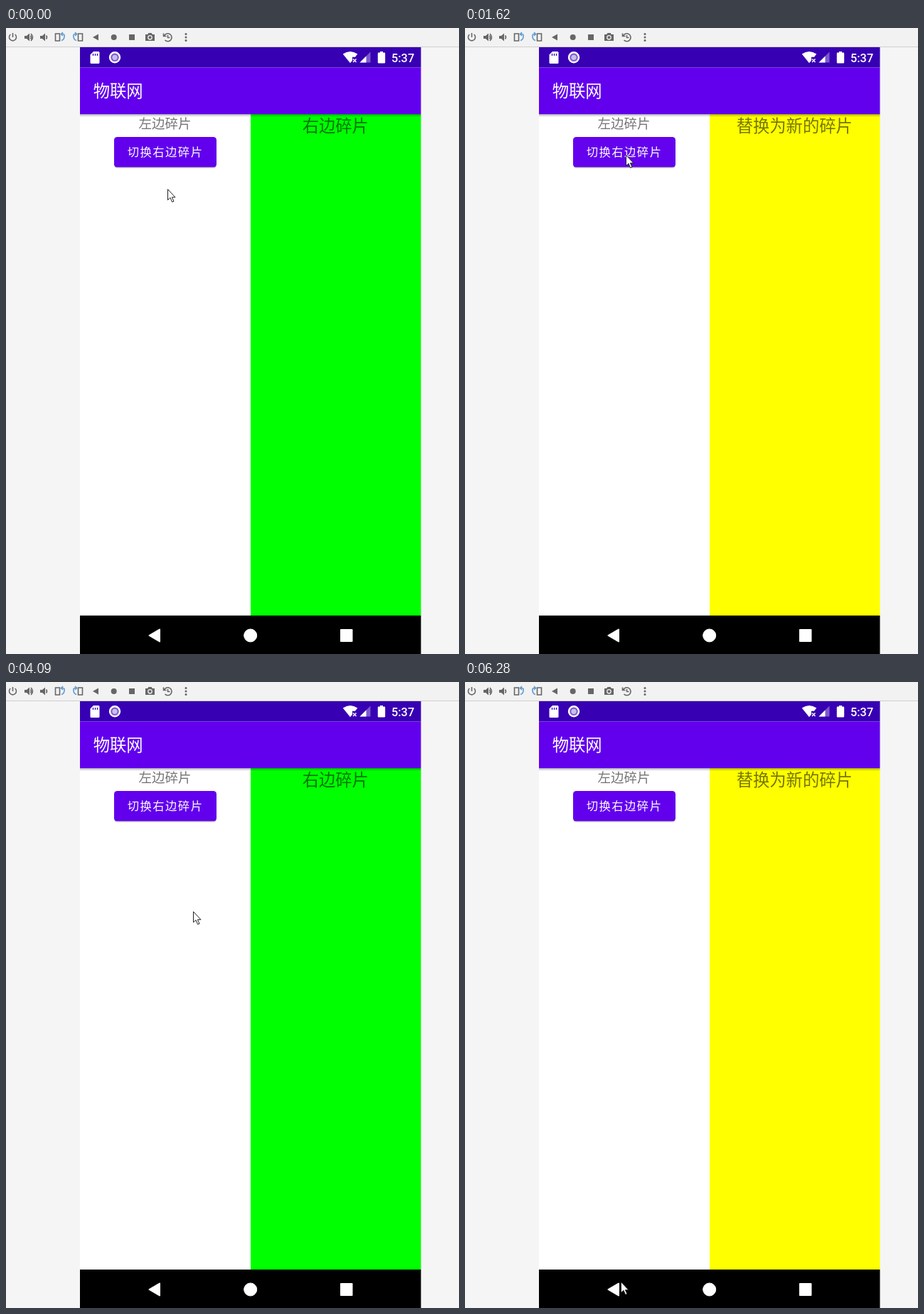
These frames come from a looping animation (637 px wide and 879 px high, 6660 ms). An HTML page:

```html
<!DOCTYPE html>
<html lang="zh-CN">
<head>
<meta charset="utf-8">
<style>
html, body { margin: 0; width: 100%; height: 100%; overflow: hidden; background: #f5f5f5; }
svg { display: block; width: 637px; height: 879px; }
text { font-family: "Noto Sans CJK SC", "Noto Sans CJK", sans-serif; font-size: 23.33px; }
.mid { text-anchor: middle; }
.line { fill: none; stroke: #666; stroke-width: 1.6; }
.blue { fill: none; stroke: #5a9bd5; stroke-width: 1.6; }
</style>
</head>
<body>
<svg viewBox="0 0 637 879">
  <defs>
    <linearGradient id="fade" x2="0" y2="1">
      <stop stop-opacity=".3"/><stop offset="1" stop-opacity="0"/>
    </linearGradient>
    <filter id="blur" x="-20%" y="-40%" width="140%" height="180%"><feGaussianBlur stdDeviation="3"/></filter>
    <filter id="soft"><feGaussianBlur stdDeviation=".7"/></filter>
    <clipPath id="face"><rect x="152" y="153" width="144" height="42.5" rx="4.5"/></clipPath>
    <clipPath id="phone"><rect x="104" y="27" width="479.5" height="852"/></clipPath>
  </defs>

  <!-- emulator controls -->
  <rect width="637" height="26" fill="#f2f2f2"/>
  <rect y="26" width="637" height="1" fill="#cfcfcf"/>
  <g fill="#666">
    <path class="line" d="M6.3 9a5 5 0 1 0 6.4 0M9.5 7v6"/>
    <path d="M26 11h3l4-3.5v11l-4-3.5h-3zM48 11h3l4-3.5v11l-4-3.5h-3z"/>
    <path class="line" d="M34.5 10.5q2 2.500 0 5M35 8q5 5 0 10M56.500 10.500q2 2.500 0 5"/>
    <path class="line" d="M69.500 8h6v10h-6zM101.500 8h6v10h-6z"/>
    <path class="blue" d="M78 8.500h2.500q2 0 1.500 4t-4 5M80 6l-2.500 2.500 2.500 2.500M99 8.500h-2.500q-2 0-1.500 4t4 5M97 6l2.500 2.500-2.500 2.500"/>
    <path d="M122 13l8-4.500v9z"/>
    <circle cx="151.700" cy="13" r="4"/>
    <rect x="173" y="9" width="8" height="8"/>
    <path d="M196 9h3l1.500-2h4l1.500 2h3v9h-13z"/>
    <circle cx="202.500" cy="13.300" r="2.700" fill="#666" stroke="#f2f2f2" stroke-width="1.300"/>
    <path class="line" d="M222.500 11a5.500 5.500 0 1 1 1 6M221.500 7.500v4h4M227.500 10v3.500h3"/>
    <circle cx="253" cy="8.500" r="1.500"/><circle cx="253" cy="13" r="1.500"/><circle cx="253" cy="17.500" r="1.500"/>
  </g>

  <g clip-path="url(#phone)">
    <rect x="104" y="121" width="240" height="704" fill="#fff"/>
    <rect id="panel" x="344" y="121" width="240" height="704"/>
    <rect x="104" y="121" width="480" height="4" fill="url(#fade)"/>
    <rect x="104" y="27" width="480" height="28.500" fill="#3700b3"/>
    <rect x="104" y="55.500" width="480" height="65.500" fill="#6200ee"/>

    <!-- status bar -->
    <g fill="#fff">
      <path d="M123 33h7q1.500 0 1.500 1.500v14q0 1.500-1.500 1.500h-10q-1.500 0-1.500-1.500V37.500z"/>
      <path d="M122.500 36v3M125.500 36v3M128.500 36v3" stroke="#3700b3" stroke-width="1.300"/>
      <circle cx="153" cy="41.300" r="7" fill="#7d5fcd" stroke="#fff" stroke-width="2.400"/>
      <circle cx="153" cy="41.300" r="3.600" fill="#cbbcec"/>
      <path d="M473.700 36.500q10.300-7 20.600 0l-3.300 4.200h-4v5l-3 3.600z"/>
      <path d="M488 43.500l4.500 4.500M492.500 43.500l-4.500 4.500" stroke="#fff" stroke-width="1.500"/>
      <path d="M512.500 33.500v15h-15z" opacity=".35"/>
      <path d="M506.500 39.500v9h-9z"/>
      <path d="M526 33h4v1.500h2q1.200 0 1.200 1.200v12.600q0 1.200-1.200 1.200h-8q-1.200 0-1.200-1.200V35.700q0-1.200 1.200-1.200h2z"/>
      <text x="542" y="47.700" style="font: 500 16.330px Roboto, sans-serif">5:37</text>
      <text x="122.700" y="97">物联网</text>
    </g>

    <text class="mid" x="223.500" y="141" style="font-size:18.500px" fill="#757575">左边碎片</text>
    <text class="mid" id="label" x="463.300" y="145.500" fill-opacity=".54"></text>

    <!-- button -->
    <rect id="lift" x="152" y="156" width="144" height="42" rx="4.500" filter="url(#blur)"/>
    <rect x="152" y="154" width="144" height="42.500" rx="4.500" opacity=".3" filter="url(#soft)"/>
    <g clip-path="url(#face)">
      <rect x="152" y="153" width="144" height="42.500" fill="#6200ee"/>
      <rect id="wash" x="152" y="153" width="144" height="42.500" fill="#fff"/>
      <circle id="ripple" fill="#fff"/>
    </g>
    <text x="170.700" y="180" fill="#fff" style="font-size:16.330px; letter-spacing:1.460px">切换右边碎片</text>

    <!-- navigation bar -->
    <rect x="104" y="825" width="480" height="54"/>
    <rect id="pill" y="825" height="55" rx="27.500" fill="#fff"/>
    <g fill="#fff" stroke="#fff" stroke-linejoin="round">
      <path d="M201.500 853l14.500-8.500v17z" stroke-width="2"/>
      <circle cx="343.700" cy="853" r="9"/>
      <rect x="470.500" y="844.500" width="16.500" height="17"/>
    </g>
  </g>

  <path id="cursor" d="M.5.500v15l3.500-3.200 2.600 6 2.400-1-2.600-5.600h4.600z" fill="#fff" stroke="#222"/>
</svg>
<script>
const LOOP = 6660, TICK = 76.6;
// bursts of change: start time and number of ticks
const bursts = [[0, 1], [210, 6], [840, 9], [1530, 2], [2410, 9], [3090, 3], [3470, 4],
  [3860, 9], [4550, 1], [4870, 9], [5580, 6], [6130, 3]];
const smooth = u => u * u * (3 - 2 * u);
const easeOut = u => 1 - (1 - u) ** 2;
// pointer moves: begin, end, control point, destination, easing
const moves = [
  [133, 593, 226, 202, 226, 178, smooth],
  [2333, 3022, 290, 500, 210, 817, smooth],
  [3013, 3243, 204, 836, 204, 853, easeOut],
  [3783, 4472, 328, 359, 216, 184, easeOut],
  [4473, 4550, 216, 183, 216, 182, smooth],
  [5503, 5963, 270, 520, 211, 860, smooth],
  [6053, 6283, 213, 850, 219, 842, easeOut]
];
const taps = [1065, 5020], BACK = 3620;

const $ = id => document.getElementById(id);
const clamp = v => Math.max(0, Math.min(1, v));
const set = (id, attrs) => { for (const k in attrs) $(id).setAttribute(k, attrs[k]); };

function snap(t) {
  const [start, n] = bursts.filter(b => b[0] <= t).pop();
  return start + TICK * Math.min(n - 1, Math.floor((t - start + 8) / TICK));
}

function pointer(t) {
  let x = 227, y = 226;
  for (const [a, b, cx, cy, ex, ey, ease] of moves) {
    if (t < a) break;
    const s = ease(clamp((t - a) / (b - a))), r = 1 - s;
    x = r * r * x + 2 * r * s * cx + s * s * ex;
    y = r * r * y + 2 * r * s * cy + s * s * ey;
  }
  return [x, y];
}

function draw(now) {
  const t = snap(now % LOOP);
  const [x, y] = pointer(t);
  set("cursor", { transform: `translate(${Math.round(x)} ${Math.round(y)})` });

  const swapped = t >= taps[1] || (t >= taps[0] && t < BACK);
  set("panel", { fill: swapped ? "#ff0" : "#0f0" });
  $("label").textContent = swapped ? "替换为新的碎片" : "右边碎片";

  // age is measured from the release of the latest tap
  const age = t - (t > 4800 ? taps[1] : taps[0]);
  const left = 1 - clamp(age / 555), drift = clamp(age / 315);
  const [tx, ty] = t > 4800 ? [215, 183] : [226, 178];
  set("wash", { opacity: 0.1 * clamp((age + 230) / 230) * left });
  set("lift", { opacity: 0.4 * clamp((age + 240) / 150) * (1 - clamp((age - 50) / 300)) });
  set("ripple", {
    cx: tx + (224 - tx) * drift, cy: ty + (174 - ty) * drift,
    r: 12.5 + 62 * drift, opacity: age < -20 ? 0 : 0.2 * left
  });

  const half = 57.5 + 5 * clamp((t - 3550) / 80);
  set("pill", {
    x: 208.7 - half, width: 2 * half,
    opacity: 0.2 * clamp((t - 3400) / 140) * (1 - clamp((t - 3710) / 300))
  });
}

function frame(now) {
  draw(now);
  requestAnimationFrame(frame);
}
draw(0);
requestAnimationFrame(frame);
</script>
</body>
</html>
```
